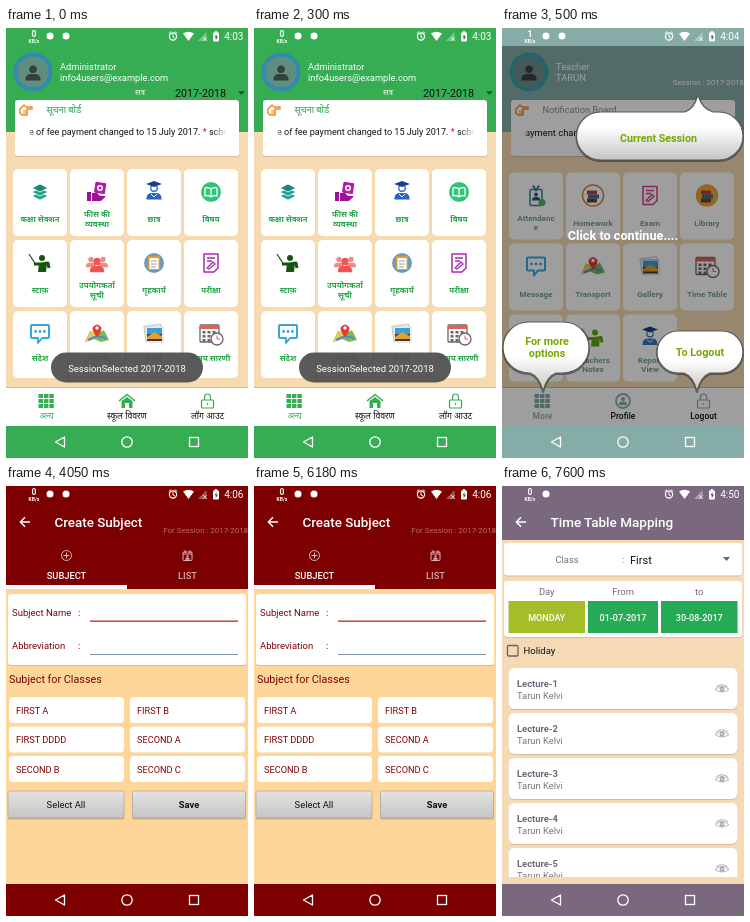
Animation of 242x430 px, one loop 8 s. Source, as an HTML page:

```html
<!DOCTYPE html>
<html lang="en">
<head>
<meta charset="utf-8">
<title>School app tour</title>
<style>
  html, body { margin: 0; width: 100%; height: 100%; overflow: hidden; }
  svg { display: block; width: 100vw; height: 100vh; }
  text { font-family: Roboto, "Noto Sans Devanagari", "Noto Sans", sans-serif; white-space: pre; }
</style>
</head>
<body>
<svg id="stage" viewBox="0 0 242 430"></svg>
<script>
const LOOP = 8000;
const range = (n, fn) => Array.from({ length: n }, (_, i) => fn(i)).join('');

// Shape helpers
const rect = (x, y, w, h, fill, r = 0, more = '') =>
  `<rect x="${x}" y="${y}" width="${w}" height="${h}" rx="${r}" fill="${fill}" ${more}/>`;
const circle = (x, y, r, fill, stroke = 'none', w = 1) =>
  `<circle cx="${x}" cy="${y}" r="${r}" fill="${fill}" stroke="${stroke}" stroke-width="${w}"/>`;
const fillPath = (d, fill) => `<path d="${d}" fill="${fill}"/>`;
const line = (d, stroke, w = 1, fill = 'none') =>
  `<path d="${d}" fill="${fill}" stroke="${stroke}" stroke-width="${w}" stroke-linejoin="round"/>`;
const text = (x, y, str, size, fill, weight = 400, anchor = 'start') =>
  `<text x="${x}" y="${y}" font-size="${size}" fill="${fill}" font-weight="${weight}" text-anchor="${anchor}">${str}</text>`;
const mid = (x, y, str, size, fill, weight = 400) => text(x, y, str, size, fill, weight, 'middle');
const at = (x, y, art) => `<g transform="translate(${x} ${y})">${art}</g>`;
const card = (x, y, w, h, r = 3) => rect(x, y + 1, w, h, '#0002', r) + rect(x, y, w, h, '#fff', r);

// System bars
function statusBar(rate, time, dots) {
  const w = '#fff';
  return mid(28, 8.5, rate, 8.5, w, 700) + mid(28, 14.5, 'KB/s', 5, w, 700) +
    dots.map(x => circle(x, 8, 3.5, w)).join('') +
    circle(167, 8.5, 3.6, 'none', w, 1.2) + line('M167 6v3l2 1M162.8 5.5l2.3-2M171.2 5.5l-2.3-2', w) +
    fillPath('M177 5.5Q182.5 2 188 5.5L182.5 13Z', w) +
    fillPath('M192 13L200.5 4V13Z', '#fff5') + line('M197 9l4 4m0-4l-4 4', '#fffa') +
    rect(207, 4.5, 6, 9, w, 1) + rect(208.7, 3.2, 2.6, 2, w) +
    fillPath('M210.5 6l-2 3.5h1.5l-.5 3 2.5-4h-1.5z', '#555') +
    text(237.5, 12.2, time, 10, w, 400, 'end');
}
const navBar = color => rect(0, 398, 242, 32, color) +
  line('M58.5 409V419L49.5 414Z', '#fff', 1.3) +
  circle(121, 414, 5.2, 'none', '#fff', 1.3) + rect(183.5, 409.5, 9, 9, 'none', 0, 'stroke="#fff" stroke-width="1.3"');
const backArrow = line('M24 36H14.5M19 31.3L14.3 36L19 40.7', '#fff', 1.5);

// Icons, each centred on its own origin
const hand = line('M-6-1L-2-5L0-3H6V-1H1V5H-4L-6 3Z', '#f08a24', 1.5, '#fff') + line('M-3 1H1M-3 3H1', '#f08a24');
const person = (color, s = 1) => `<g transform="scale(${s})">` + circle(0, -4, 4, color) +
  fillPath('M-8 8Q-8 1-3 1H3Q8 1 8 8Z', color) + '</g>';
const layers = range(3, i => line(`M-8 ${4 - i * 4}L0 ${8 - i * 4}L8 ${4 - i * 4}L0 ${i * -4}Z`, '#fff', .8, i < 2 ? '#20a08c' : '#168879'));
const fees = rect(-3, -10, 11, 11, '#b01ca8', 1, 'transform="rotate(9)"') + circle(3, -4, 3, '#fff') + circle(3, -4, 1.5, '#b01ca8') +
  rect(-10, 0, 4, 9, '#9c1496') + fillPath('M-5 1H0L3 4H9L4 9H-5Z', '#9c1496');
const student = color => person(color, .95) + circle(0, -4, 2.6, '#fff') +
  fillPath('M-8-8L0-11L8-8L0-5Z', '#173d8c') + line('M-3 2L0 5L3 2', '#fff');
const openBook = circle(0, 0, 10, '#2fc478') + line('M0-3Q-3-5-6-4V4Q-3 3 0 5Q3 3 6 4V-4Q3-5 0-3V5', '#fff', 1.3);
const teacher = color => circle(2, -5, 3, color) + line('M-11-9L-4 2', color, 1.2) +
  line('M-6 1L1 1L8 0L9 5', color, 3) + fillPath('M-1 0H7L6 9H-2Z', color);
const crowd = at(-6, -1, person('#f58a80', .65)) + at(6, -1, person('#f58a80', .65)) + at(0, 2, person('#ef5555', .9));
const clipboard = circle(0, 0, 10, '#7399b8') + rect(-6, -7, 12, 14, '#d79b44', 1) + rect(-4.5, -5, 9, 11, '#fff') +
  line('M-3-2H3M-3 1H3M-3 4H2', '#888', .8);
const paper = color => line('M-7-9H7V5L3 9H-7Z', color, 1.5, '#fff') +
  line('M-4-5H4M-4-2H1M-4 5L2-1L4 1L-2 6Z', color, 1.3);
const chat = line('M-8-9H8Q9-9 9-8V3Q9 4 8 4H2L-2 9V4H-8Q-9 4-9 3V-8Q-9-9-8-9Z', '#39a7df', 2, '#fff') +
  range(3, i => circle(i * 4.5 - 4.5, -2.5, 1.4, '#39a7df'));
const map = fillPath('M-12 8L-7-3L0 0L7-4L12 6L4 8L-3 5Z', '#79b957') + fillPath('M-7-3L0 0L-3 5L-12 8Z', '#e9c94b') +
  line('M-9 6L0 2L9 4', '#4a8dd0', 2) + fillPath('M0 3Q-6-4-4-7Q0-12 4-7Q6-4 0 3Z', '#df3c32') + circle(0, -6, 1.7, '#fff');
const photos = `<g transform="rotate(-8)">${rect(-9, -9, 17, 15, '#eee', 0, 'stroke="#999" stroke-width=".5"')}</g>` +
  rect(-8, -7, 17, 15, '#fff', 0, 'stroke="#aaa" stroke-width=".5"') + rect(-7, -6, 15, 6, '#39a0d8') +
  rect(-7, 0, 15, 7, '#4c392e') + fillPath('M-7 3L0-2L8 2V5H-7Z', '#e2a02e');
const calendar = rect(-11, -9, 19, 17, '#fff', 1, 'stroke="#666" stroke-width="1.3"') + rect(-11, -9, 19, 4, '#d9645c') +
  range(9, i => rect(-8.5 + i % 3 * 5, -3 + (i / 3 | 0) * 4, 3, 2.5, '#666')) +
  circle(6, 5, 6, '#fff', '#666', 1.3) + line('M6 1.500V5H9', '#d9645c');
const badge = rect(-6, -6, 12, 16, '#fff', 1, 'stroke="#357b9b" stroke-width="1.5"') + line('M-3-10L0-5L3-10', '#357b9b', 2) +
  at(0, 1, person('#2c5876', .5)) + circle(6, 7, 3.5, '#4bb562');
const books = (disc, ring) => circle(0, 0, 10.5, disc, ring, 1.5) + rect(-6, -5, 10, 4, '#c33d35') +
  rect(-5, -1, 11, 4, '#326ca0') + rect(-6, 3, 10, 4, '#6e3f2d');
const gridIcon = color => range(9, i => rect(-8 + i % 3 * 5.4, -7 + (i / 3 | 0) * 5, 4.5, 4, color));
const home = color => line('M-8 0L0-6.500L8 0', color, 1.6) + fillPath('M-5.500 0L0-4L5.500 0V7H2V2H-2V7H-5.500Z', color);
const lock = color => rect(-6, -1, 12, 8, 'none', 1, `stroke="${color}" stroke-width="1.2"`) +
  line('M-3-1V-4Q-3-7 0-7Q3-7 3-4V-1M0 2V4', color, 1.2);
const eye = line('M-7 0Q0-6 7 0Q0 5-7 0ZM-6-2.500Q0-7 6-2.500', '#aaa', .9) + circle(0, -.3, 2, '#ccc', '#888', .8);

// Dashboard parts
const tileX = col => 7 + col * 57;
function tile(col, y, icon, lines, color, size, labelY) {
  const cx = tileX(col) + 27;
  return rect(tileX(col), y, 54, 67, '#fff', 5) + at(cx, y + 23, icon) +
    lines.map((s, i) => mid(cx, y + labelY + i * 9.5 - (lines.length - 1) * 4.7, s, size, color, 700)).join('');
}
const avatar = (ring, inner, figure) => circle(27, 44, 17.5, inner, ring, 4) + at(27, 45, person(figure, .95));
function tabBar(labels, icons, colors, size) {
  return rect(0, 359, 242, 39, '#fff') + rect(0, 359, 242, 1, '#bbb') +
    [40.5, 121, 201.5].map((x, i) => at(x, 373, icons[i]) + mid(x, 390.7, labels[i], size, colors[i], 500)).join('');
}

function hindiHome() {
  const green = '#36ad53', label = '#28a34b';
  const rows = [
    [[layers, 'कक्षा सेक्शन'], [fees, 'फीस की|व्यवस्था'], [student('#2961c4'), 'छात्र'], [openBook, 'विषय']],
    [[teacher('#16540f'), 'स्टाफ़'], [crowd, 'उपयोगकर्ता|सूची'], [clipboard, 'गृहकार्य'], [paper('#ad28b5'), 'परीक्षा']],
    [[chat, 'संदेश'], [map, 'ट्रान्सपोर्ट'], [photos, 'गैलरी'], [calendar, 'समय सारणी']]
  ];
  return rect(0, 0, 242, 430, '#f5dab2') + rect(0, 0, 242, 104, green) + statusBar('0', '4:03', [44, 60]) +
    avatar('#318bb0', '#5f8d7e', '#34403f') +
    text(54, 42, 'Administrator', 9.3, '#fff') + text(54, 53, 'info4users@example.com', 9.3, '#fff') +
    text(129, 67, 'सत्र', 8, '#fff', 500) + text(169, 69, '2017-2018', 10.7, '#111') + fillPath('M232 63H239L235.5 67Z', '#185e2a') +
    card(9, 72, 224, 56) + at(20, 82, hand) + text(40.5, 85, 'सूचना बोर्ड', 9.2, label) +
    text(23, 107, 'e of fee payment changed to 15 July 2017. <tspan fill="#e00">*</tspan> scho', 9.1, '#111') +
    rect(10, 95, 18, 18, 'url(#fadeLeft)') + rect(207, 95, 25, 18, 'url(#fadeRight)') +
    rows.map((row, r) => row.map(([icon, name], c) =>
      tile(c, 141 + r * 71, icon, name.split('|'), label, 8, r === 2 ? 50 : 53)).join('')).join('') +
    tabBar(['अन्य', 'स्कूल विवरण', 'लॉग आउट'], [gridIcon(green), home(green), lock(green)], [green, '#111', '#111'], 8.7) +
    rect(45, 324.5, 152, 30, '#505050', 15, 'opacity=".94"') + mid(121, 344, 'SessionSelected 2017-2018', 9.5, '#fff') +
    navBar(green);
}

// Speech balloon with a tail reaching (tx, ty)
function balloon(x, y, w, h, tx, ty) {
  const r = h / 2, b = y + h, up = ty < y, cap = (dx, dy) => `a${r} ${r} 0 0 1 ${dx} ${dy}`;
  const top = up ? `H${tx - 13}Q${tx - 4} ${y - 3} ${tx} ${ty}Q${tx + 4} ${y - 3} ${tx + 15} ${y}` : '';
  const low = up ? '' : `H${tx + 13}Q${tx + 4} ${b + 3} ${tx} ${ty}Q${tx - 4} ${b + 3} ${tx - 13} ${b}`;
  const d = `M${x + r} ${y}${top}H${x + w - r}${cap(0, h)}${low}H${x + r}${cap(0, -h)}Z`;
  return at(0, 1, line(d, '#0006', 2)) + line(d, '#5c5c5c', 1.2, 'url(#bubble)');
}

function teacherTour() {
  const teal = '#86aca7', label = '#719e98', hint = '#76a800';
  const rows = [
    [[badge, 'Attendanc|e'], [books('#fff', '#d9823b'), 'Homework'], [paper('#d43b85'), 'Exam'], [books('#e9a72f', '#e9a72f'), 'Library']],
    [[chat, 'Message'], [map, 'Transport'], [photos, 'Gallery'], [calendar, 'Time Table']],
    [[paper('#777'), ''], [teacher('#62a51c'), 'Teachers|Notes'], [student('#3178b2'), 'Report|View']]
  ];
  return rect(0, 0, 242, 430, '#f5dab2') + rect(0, 18, 242, 86, teal) +
    avatar('#37a3aa', '#6f8f92', '#3b4145') +
    text(54, 42, 'Teacher', 9.4, '#fff') + text(54, 53, 'TARUN', 9.4, '#fff') +
    text(242, 57, 'Session : 2017-2018', 7.9, '#fff', 400, 'end') +
    card(9, 72, 224, 56) + at(20, 82, hand) + text(40.5, 85, 'Notification Board', 9.2, '#8a8a8a') +
    text(23, 108, 'ayment changed to', 9.4, '#111') + rect(10, 96, 17, 16, 'url(#fadeLeft)') +
    rows.map((row, r) => row.map(([icon, name], c) =>
      tile(c, 144.5 + r * 71, icon, name.split('|'), label, 8.1, 53)).join('')).join('') +
    tabBar(['More', 'Profile', 'Logout'],
      [gridIcon(teal), circle(0, 0, 7, 'none', teal, 1.8) + person(teal, .5), lock(teal)], [teal, '#111', '#111'], 8.5) +
    rect(0, 18, 242, 380, '#000', 0, 'opacity=".38"') +
    rect(0, 0, 242, 18, teal) + statusBar('1', '4:04', [44, 60]) + navBar(teal) +
    mid(121, 212, 'Click to continue....', 12.7, '#fff', 700) +
    balloon(74.5, 84, 166.5, 48, 196, 67) + mid(156.5, 114, 'Current Session', 10.7, hint, 700) +
    balloon(1, 294, 86, 51, 41, 363) + mid(45, 316.5, 'For more', 10.8, hint, 700) +
    `<g clip-path="url(#hintClip)">${mid(45, 329, 'options', 10.8, hint, 700)}</g>` +
    balloon(155, 303, 86, 42, 195, 363) + mid(198, 328, 'To Logout', 10.8, hint, 700);
}

function createSubject() {
  const maroon = '#7d0000', faded = '#d9b5b5';
  const classes = ['FIRST A', 'FIRST B', 'FIRST DDDD', 'SECOND A', 'SECOND B', 'SECOND C'];
  const button = (x, w, label, weight) => rect(x, 306, w, 27.5, '#0003', 1) +
    rect(x, 305, w, 27, 'url(#button)', 1, 'stroke="#aaa" stroke-width=".8"') + mid(x + w / 2, 322, label, 9.4, '#111', weight);
  return rect(0, 0, 242, 430, '#ffd699') + rect(0, 0, 242, 103, maroon) + statusBar('0', '4:06', [44, 60]) + backArrow +
    text(48.5, 41, 'Create Subject', 13.4, '#fff', 500) + text(242, 47, 'For Session : 2017-2018', 7.9, '#b96a66', 400, 'end') +
    circle(60.5, 69.5, 5, 'none', faded) + line('M57.5 69.5H63.5M60.5 66.5V72.5', faded) +
    rect(177, 66, 9, 8.5, 'none', 1, `stroke="${faded}"`) + line('M179 64V67M184 64V67M177 68H186', faded) + at(181.5, 71.5, person(faded, .28)) +
    mid(60.5, 93, 'SUBJECT', 9.3, '#fff', 500) + mid(181.5, 93, 'LIST', 9.3, '#d5aaaa', 500) + rect(0, 99, 121, 4, '#fff') +
    card(2, 108, 238, 71) +
    text(6, 129.5, 'Subject Name', 9.5, maroon) + text(72, 129.5, ':', 9.5, maroon) + rect(84, 134.5, 148, 1.3, '#c62020') +
    text(6, 163, 'Abbreviation', 9.5, maroon) + text(72, 163, ':', 9.5, maroon) + rect(84, 168, 148, 1, '#8194a5') +
    text(3, 197, 'Subject for Classes', 10.8, maroon) +
    classes.map((name, i) => {
      const x = 3 + i % 2 * 121, y = 211 + (i >> 1) * 29.5;
      return rect(x, y, 115, 26, '#fff', 4) + text(x + 7, y + 16.5, name, 9.2, maroon);
    }).join('') +
    button(2, 116, 'Select All', 400) + button(126.5, 113, 'Save', 700) + navBar(maroon);
}

function timeTable() {
  const purple = '#7a697e', grey = '#75667a', green = '#27aa55';
  const column = (x, w, title, value, color) => mid(x + w / 2, 109, title, 9.4, grey) +
    rect(x, 115, w, 32, color) + mid(x + w / 2, 134.5, value, 9, '#fff', 500);
  const lecture = i => {
    const y = 182 + i * 45;
    return card(6.5, y, 229, 41, 6) + text(15, y + 18.7, `Lecture-${i + 1}`, 9.4, grey, 700) +
      text(15, y + 30.7, 'Tarun Kelvi', 9.4, '#777') + at(220, y + 21.5, eye);
  };
  return rect(0, 0, 242, 430, '#f5dab5') + rect(0, 0, 242, 54, purple) + statusBar('0', '4:50', [44]) + backArrow +
    text(48.5, 41, 'Time Table Mapping', 13.5, '#fff', 500) +
    card(2, 57, 238, 32.5) + mid(65, 77, 'Class', 9.4, grey) + text(120, 77, ':', 9.4, grey) +
    text(128, 77.5, 'First', 11, '#111') + fillPath('M221 71H228L224.5 75Z', '#666') +
    card(2, 95, 238, 56) + column(6.5, 76.5, 'Day', 'MONDAY', '#a4be28') +
    column(86, 70, 'From', '01-07-2017', green) + column(159, 76.5, 'to', '30-08-2017', green) +
    rect(5.5, 159.5, 10.5, 10.5, 'none', 1, 'stroke="#666" stroke-width="1.3"') + text(21.5, 168.2, 'Holiday', 9.5, '#111') +
    `<g clip-path="url(#listClip)">${range(5, lecture)}</g>` + navBar(purple);
}

const gradient = (id, stops, direction = '') => `<linearGradient id="${id}" ${direction}>` +
  stops.map(([offset, color, alpha = 1]) => `<stop offset="${offset}" stop-color="${color}" stop-opacity="${alpha}"/>`).join('') + '</linearGradient>';
const down = 'x1="0" y1="0" x2="0" y2="1"';
const defs = '<defs>' + gradient('fadeLeft', [[.6, '#fff'], [1, '#fff', 0]]) +
  gradient('fadeRight', [[0, '#fff', 0], [.55, '#fff']]) +
  gradient('bubble', [[0, '#fff'], [.5, '#fff'], [1, '#c4c4c4']], down) +
  gradient('button', [[0, '#e3e3e3'], [1, '#c5c5c5']], down) +
  '<clipPath id="hintClip"><rect y="318" width="90" height="12"/></clipPath>' +
  '<clipPath id="listClip"><rect y="175" width="242" height="216"/></clipPath></defs>';

const timeline = [[0, hindiHome], [500, teacherTour], [4050, createSubject], [7600, timeTable]];
const stage = document.getElementById('stage');
stage.innerHTML = defs + timeline.map(([, draw]) => `<g class="scene">${draw()}</g>`).join('');
const scenes = [...stage.querySelectorAll('.scene')];

function show(now) {
  const t = now % LOOP;
  const current = timeline.filter(([start]) => start <= t).length - 1;
  scenes.forEach((scene, i) => { scene.style.display = i === current ? '' : 'none'; });
  requestAnimationFrame(show);
}
show(0);
</script>
</body>
</html>
```
